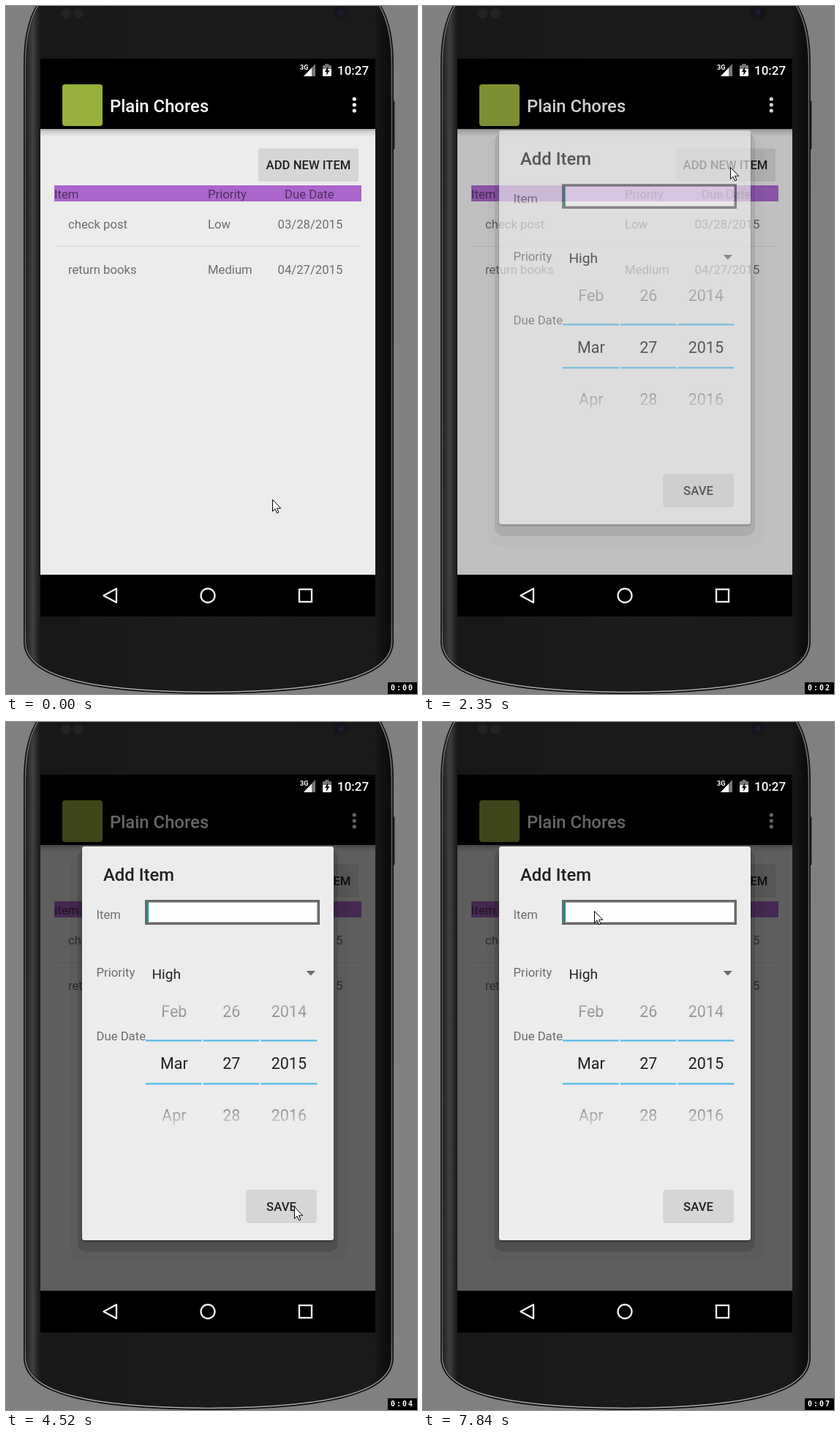
Animation of 562 by 940 pixels, one loop 8 s. Source, as an HTML page with a canvas:

```html
<!DOCTYPE html>
<html lang="en">
<head>
<meta charset="utf-8">
<title>Todo dialog demo</title>
<style>
  html, body { margin: 0; width: 100%; height: 100%; overflow: hidden; background: #808080; }
  canvas { display: block; }
</style>
</head>
<body>
<canvas id="stage" width="562" height="940"></canvas>
<script>
const LOOP = 8000, W = 562, H = 940;
const INK = '#212121', SOFT = 'rgba(0,0,0,.54)', PANEL = '#ececec';
const stage = document.getElementById('stage').getContext('2d');

function layer() {
  const c = document.createElement('canvas');
  c.width = W;
  c.height = H;
  return c.getContext('2d');
}
const phone = layer(), dialog = layer(), toast = layer();

// Held keys: time, then values
const CURSOR = [
  [0, 364, 674], [270, 357, 675], [390, 370, 674], [510, 383, 673],
  [660, 402, 520], [790, 418, 355], [930, 419, 300], [1040, 420, 262],
  [1150, 420, 240], [1310, 420, 220], [2940, 418, 220], [3080, 345, 250],
  [3180, 273, 278], [3340, 103, 304], [3480, 280, 218], [3600, 518, 430],
  [3720, 345, 660], [3880, 352, 676], [4020, 368, 672], [4133, 384, 665],
  [4247, 394, 662], [5363, 388, 668], [5480, 373, 678], [5640, 179, 678],
  [5780, 140, 625], [5940, 341, 610], [6080, 330, 690], [6197, 230, 726],
  [6313, 121, 725], [6430, 125, 660], [6547, 135, 600], [6660, 155, 552],
  [6780, 270, 250], [6940, 290, 121], [7080, 275, 141], [7230, 252, 190],
  [7345, 240, 235], [7460, 235, 254], [7600, 234, 258]
];
const DIALOG = [[0, 0, 0], [2237, .33, .1], [2350, .66, .19], [2510, 1, .6]];
const TOAST = [[0, 0], [5013, .3], [5130, .65], [5247, 1], [7345, .7], [7460, .4], [7600, .15], [7720, 0]];
const CARET = [[0, 1], [2940, 0], [3480, 1], [3880, 0], [4520, 1], [5013, 0],
  [5640, 1], [6080, 0], [6547, 1], [7230, 0], [7600, 1]];
const CLICKS = [[1860, 2010], [4780, 4897]];

function hold(keys, t) {
  let now = keys[0];
  for (const k of keys) if (k[0] <= t) now = k;
  return now.slice(1);
}

function box(c, x1, y1, x2, y2, fill, r = 0) {
  c.fillStyle = fill;
  c.beginPath();
  c.roundRect(x1, y1, x2 - x1, y2 - y1, r);
  c.fill();
}

function dot(c, x, y, r, fill) {
  c.fillStyle = fill;
  c.beginPath();
  c.arc(x, y, r, 0, 7);
  c.fill();
}

function poly(c, pts) {
  c.beginPath();
  pts.forEach(([x, y]) => c.lineTo(x, y));
  c.closePath();
}

function shape(c, pts, fill) {
  poly(c, pts);
  c.fillStyle = fill;
  c.fill();
}

function text(c, str, x, y, size, fill, weight = 400, align = 'left') {
  c.font = `${weight} ${size}px Roboto, sans-serif`;
  c.textAlign = align;
  c.fillStyle = fill;
  c.fillText(str, x, y);
}

function fade(c, x1, y1, x2, y2, stops) {
  const g = c.createLinearGradient(x1, y1, x2, y2);
  stops.forEach(([p, col]) => g.addColorStop(p, col));
  return g;
}

function button(c, x1, y1, x2, y2, label) {
  box(c, x1, y1 + 1, x2, y2 + 1.3, 'rgba(0,0,0,.14)', 3);
  box(c, x1, y1, x2, y2, '#d5d7d6', 3);
  text(c, label, (x1 + x2) / 2, (y1 + y2) / 2 + 6.5, 16.7, INK, 500, 'center');
}

function outline(c, d) {
  c.beginPath();
  c.moveTo(43 + d, -4);
  c.bezierCurveTo(31 + d, 16, 24 + d, 40, 24 + d, 80);
  c.lineTo(24 + d, 870);
  c.bezierCurveTo(26 + d, 915 - d, 100, 939 - d, 277, 940 - d);
  c.bezierCurveTo(454, 939 - d, 528 - d, 915 - d, 530 - d, 870);
  c.lineTo(530 - d, 80);
  c.bezierCurveTo(530 - d, 40, 523 - d, 16, 511 - d, -4);
  c.closePath();
}

function drawBody(c) {
  box(c, 0, 0, W, H, '#808080');
  box(c, 527, 129, 531.5, 196, '#222', 2);
  outline(c, 0);
  c.fillStyle = '#111';
  c.fill();
  outline(c, 4);
  c.fillStyle = fade(c, 24, 0, 530, 0, [
    [0, '#111'], [.012, '#2b2b2b'], [.025, '#414141'], [.036, '#2a2a2a'], [.046, '#171717'],
    [.5, '#1b1b1b'], [.95, '#191919'], [.975, '#101010'], [1, '#090909']]);
  c.fill();
  outline(c, 2.5);
  c.strokeStyle = fade(c, 0, 0, 0, H, [[0, '#777'], [.2, '#606060'], [.9, '#666'], [1, '#b0b0b0']]);
  c.lineWidth = 1.5;
  c.stroke();
  dot(c, 82, 10, 7, '#222');
  dot(c, 99, 10, 7, '#222');
  dot(c, 458, 9, 10, '#14141a');
  dot(c, 458, 9, 4, '#1b1b2c');
}

function drawStatus(c) {
  text(c, '3G', 402, 86.5, 9, '#fff', 700);
  shape(c, [[407, 96], [423, 96], [423, 79]], '#777');
  shape(c, [[407, 96], [418, 96], [418, 84.5]], '#fff');
  box(c, 436.5, 79, 441.5, 82, '#777');
  box(c, 433, 81, 445, 87, '#777', 1);
  box(c, 433, 86, 445, 96, '#fff', 1);
  shape(c, [[440, 83], [436, 90], [438.5, 90], [438, 95], [442.5, 88], [440, 88]], '#000');
  text(c, '10:27', 453, 94, 17, '#fff', 500);
}

function drawNav(c) {
  c.strokeStyle = '#f0f0f0';
  c.lineWidth = 2.3;
  c.lineJoin = 'round';
  poly(c, [[133.5, 805.5], [151, 796], [151, 815]]);
  c.stroke();
  c.beginPath();
  c.arc(276, 805.5, 9.5, 0, 7);
  c.stroke();
  c.lineJoin = 'miter';
  c.strokeRect(401, 797, 17, 17);
}

function drawList(c) {
  box(c, 47, 72, 505, 834, '#000');
  box(c, 47, 168, 505, 777, PANEL);
  box(c, 47, 168, 505, 179, fade(c, 0, 168, 0, 179, [[0, '#aaa'], [.35, '#d0d0d0'], [1, PANEL]]));
  drawStatus(c);
  drawNav(c);
  box(c, 77, 107, 132, 164, '#98b03e', 4);
  text(c, 'Plain Chores', 142, 145, 23.85, '#fff', 500);
  for (const y of [127, 135, 143]) dot(c, 476.3, y, 2.6, '#fff');

  button(c, 345, 194.5, 482, 238, 'ADD NEW ITEM');
  box(c, 66, 245, 486, 267, '#aa66cc');
  text(c, 'Item', 66, 263, 16.7, SOFT);
  text(c, 'Priority', 276, 263, 16.7, SOFT);
  text(c, 'Due Date', 381, 263, 16.7, SOFT);
  const rows = [['check post', 'Low', '03/28/2015'], ['return books', 'Medium', '04/27/2015']];
  rows.forEach((row, i) =>
    row.forEach((s, j) => text(c, s, [85, 276, 371.5][j], 304.3 + i * 61.3, 16.7, SOFT)));
  box(c, 66, 328, 486, 329, '#d6d6d6');
}

function drawDialog(c) {
  box(c, 88, 178, 466, 738, 'rgba(0,0,0,.03)', 18);
  box(c, 98, 174, 454, 724, 'rgba(0,0,0,.13)', 12);
  box(c, 103, 171, 449, 711, 'rgba(0,0,0,.2)', 5);
  box(c, 104, 170, 448, 708, PANEL, 3);
  text(c, 'Add Item', 133, 217.3, 23.85, INK, 500);
  text(c, 'Item', 123.5, 269, 16.7, SOFT);
  text(c, 'Priority', 123.5, 347.5, 16.7, SOFT);
  text(c, 'Due Date', 123.5, 435.3, 16.7, SOFT);
  text(c, 'High', 199.5, 351, 19.08, INK);
  shape(c, [[410.5, 340], [423, 340], [416.8, 346.5]], '#6a6a6a');

  box(c, 190, 243, 429, 277, '#686868');
  box(c, 194, 246.5, 425.5, 273.5, '#fff');

  const above = fade(c, 0, 385, 0, 404, [[0, '#acacac'], [1, '#8c8c8c']]);
  const below = fade(c, 0, 528, 0, 550, [[0, '#8a8a8a'], [1, '#d0d0d0']]);
  const wheels = [['Feb', 'Mar', 'Apr'], ['26', '27', '28'], ['2014', '2015', '2016']];
  wheels.forEach((wheel, i) => {
    const mid = 229.8 + i * 78.5, x = 191 + i * 78.8;
    wheel.forEach((s, j) =>
      text(c, s, mid, 402.5 + j * 71.4, 21.5, [above, INK, below][j], 400, 'center'));
    for (const y of [434, 493]) box(c, x, y, x + 76.7, y + 2.5, '#5fc1ea');
  });
  button(c, 328.5, 639, 424.5, 683, 'SAVE');
}

function drawToast(c) {
  box(c, 170, 648, 381.5, 701, 'rgba(80,80,80,.9)', 26.5);
  text(c, 'Please enter an item', 275.7, 681, 16.7, '#fff', 400, 'center');
}

function drawCursor(c, x, y, pressed) {
  if (pressed) {
    c.lineWidth = 1;
    [[10, 'rgba(0,0,0,.7)'], [9, 'rgba(255,255,255,.7)']].forEach(([r, col]) => {
      c.strokeStyle = col;
      c.beginPath();
      c.arc(x + 1.5, y + 1.5, r, 0, 7);
      c.stroke();
    });
  }
  c.save();
  c.translate(x + .5, y + .5);
  poly(c, [[0, 0], [0, 16], [3.6, 12.6], [6, 18.4], [8.4, 17.3], [6, 11.7], [11.2, 11.7]]);
  c.fillStyle = '#fff';
  c.fill();
  c.strokeStyle = '#000';
  c.lineWidth = 1;
  c.stroke();
  c.restore();
}

function drawClock(c, t) {
  box(c, 522, 924, W, H, '#000');
  c.font = 'bold 10px "DejaVu Sans Mono", monospace';
  c.textAlign = 'left';
  c.fillStyle = '#fff';
  const sec = Math.max(0, Math.floor((t - 60) / 1000));
  [...`0:0${sec}`].forEach((ch, i) => c.fillText(ch, 526 + i * 8, 935));
}

function blend(c, src, alpha) {
  c.globalAlpha = alpha;
  c.drawImage(src.canvas, 0, 0);
  c.globalAlpha = 1;
}

function render(t) {
  const c = stage;
  const [shown, dim] = hold(DIALOG, t);
  const [toastAlpha] = hold(TOAST, t);
  const [x, y] = hold(CURSOR, t);
  c.drawImage(phone.canvas, 0, 0);
  if (shown) {
    box(c, 47, 97, 505, 777, `rgba(0,0,0,${dim})`);
    blend(c, dialog, shown);
    if (hold(CARET, t)[0]) {
      c.globalAlpha = shown;
      box(c, 192.5, 246.5, 195, 273.5, '#1d9488');
      c.globalAlpha = 1;
    }
  }
  if (toastAlpha) blend(c, toast, toastAlpha);
  drawCursor(c, x, y, CLICKS.some(([a, b]) => t >= a && t < b));
  drawClock(c, t);
}

drawBody(phone);
drawList(phone);
drawDialog(dialog);
drawToast(toast);

const start = performance.now();
function tick() {
  render((performance.now() - start) % LOOP);
  requestAnimationFrame(tick);
}
tick();
</script>
</body>
</html>
```
